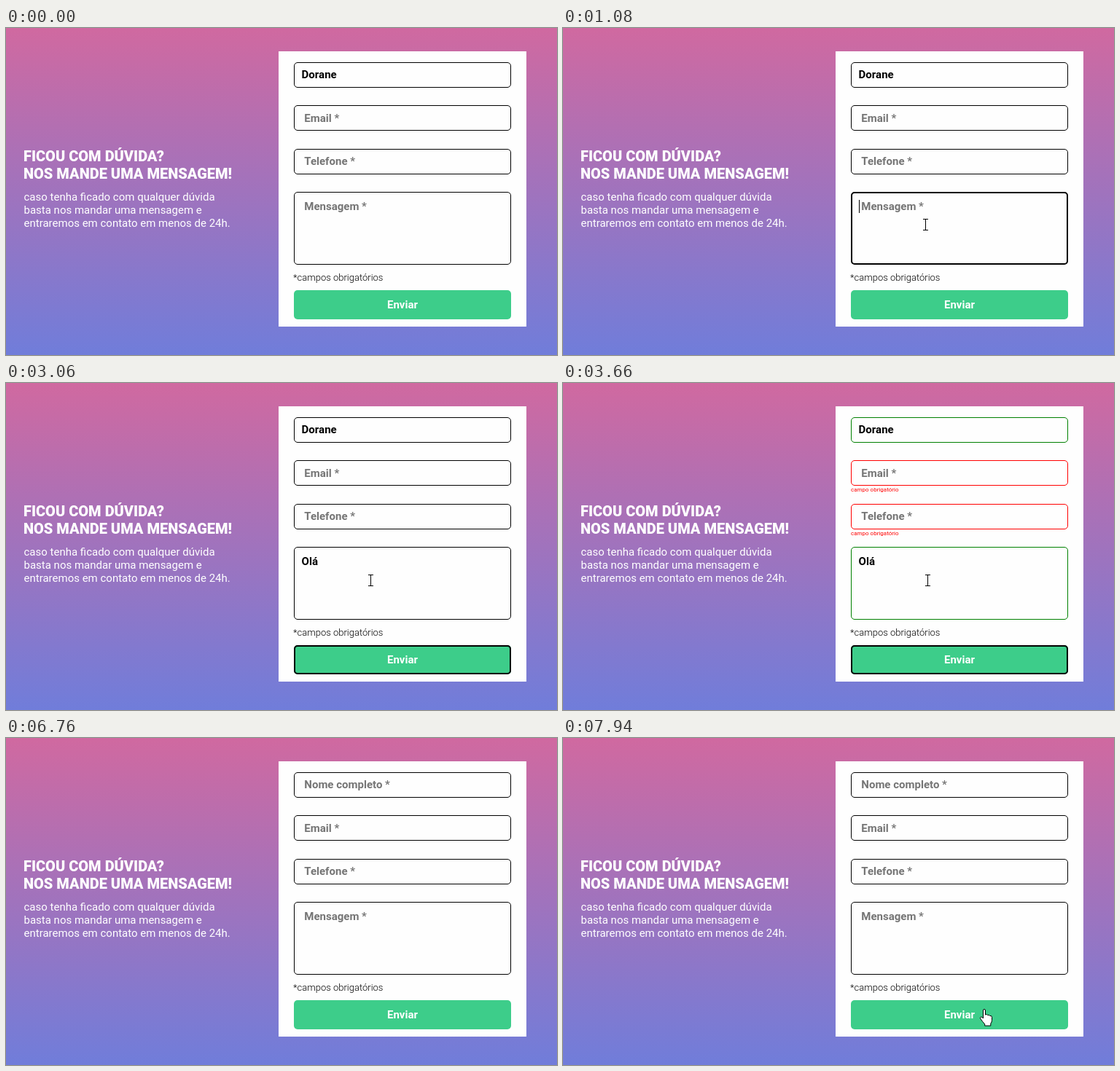
An HTML page that plays this animation: 756 px wide and 449 px high, repeating every 8000 ms.

```html
<!DOCTYPE html>
<html lang="pt-BR">
<head>
<meta charset="utf-8">
<title>Formulário de contato</title>
<style>
  html, body { margin: 0; width: 100%; height: 100%; overflow: hidden; }
  svg { display: block; width: 756px; height: 449px; font: 15px Roboto, sans-serif; }
  .title { font-size: 20px; font-weight: 900; }
  .field { fill: none; }
  .value, .send { font-weight: 700; }
  .note { font-size: 13px; font-weight: 300; }
  .error { font-size: 8px; fill: red; }
  .pointer { fill: #fff; stroke: #000; stroke-linejoin: round; }
</style>
</head>
<body>
<svg viewBox="0 0 756 449">
  <defs>
    <linearGradient id="sky" x2="0" y2="1">
      <stop stop-color="#d069a0"/>
      <stop offset="1" stop-color="#707dda"/>
    </linearGradient>
  </defs>
  <rect width="756" height="449" fill="url(#sky)"/>
  <g fill="#fff">
    <g class="title">
      <text x="24" y="183">FICOU COM DÚVIDA?</text>
      <text x="24" y="207">NOS MANDE UMA MENSAGEM!</text>
    </g>
    <text x="24.5" y="237">caso tenha ficado com qualquer dúvida</text>
    <text x="24.5" y="255">basta nos mandar uma mensagem e</text>
    <text x="24.5" y="273">entraremos em contato em menos de 24h.</text>
  </g>
  <rect x="374" y="32" width="340" height="378" fill="#fefefe"/>
  <g id="form"></g>
  <rect id="caret" y="236" width="1" height="18"/>
  <text class="note" x="394" y="347">*campos obrigatórios</text>
  <rect x="395" y="360" width="298" height="40" rx="5" fill="#3dcd8a"/>
  <rect id="ring" x="396" y="361" width="296" height="38" rx="4" fill="none" stroke="#000" stroke-width="2"/>
  <text class="send" x="544" y="385" fill="#fff" text-anchor="middle">Enviar</text>
  <g id="cursor">
    <path id="arrow" class="pointer" d="M.5.5v16l3.7-3.6 2.4 5.5 2.2-1-2.4-5.2h5z"/>
    <path id="beam" fill="none" stroke="#000" d="M-3-7.5h7M-3 7.5h7M.5-7.5v15"/>
    <path id="hand" class="pointer" d="M-1.5 13V2a1.5 1.5 0 0 1 3 0v6q2.8-1.2 3.3.6 2.3-.8 3 .9 2.7-.5 2.7 1.8v4q0 3-1.7 4.8v3H.7v-2.3Q-2.2 18-5.3 13.3-6 11.5-4.5 11-3 10.8-1.5 13z"/>
  </g>
</svg>
<script>
const LOOP = 8000;
const FOCUS = 1010, TAB = 3060, SUBMIT = 3660, RESET = 6760, BLINK = 530;
const KEYS = [[1870, 'O', 416], [2070, 'Ol', 420], [2330, 'Olá', 428]];

// Pointer stops: time, x, y. Each move is shown in discrete steps.
const MOVES = [
  { step: 80, end: 5120, stops: [[330, 637, 405], [490, 580, 335], [650, 496, 256],
    [730, 492, 262], [810, 497, 270], [1010, 497, 270], [1340, 500, 271]] },
  { step: 70, end: LOOP, stops: [[7030, 425, 2], [7240, 450, 110], [7520, 530, 285],
    [7800, 578, 366], [7940, 578, 372]] }
];

const $ = id => document.getElementById(id);
const show = (node, on) => node.style.display = on ? '' : 'none';

function add(tag, attributes) {
  const node = document.createElementNS('http://www.w3.org/2000/svg', tag);
  for (const name in attributes) node.setAttribute(name, attributes[name]);
  return $('form').appendChild(node);
}

function makeField(hint, y, height, baseline) {
  return {
    hint, y, height,
    box: add('rect', { class: 'field' }),
    text: add('text', { class: 'value', y: baseline }),
    error: add('text', { class: 'error', x: 395, y: y + height + 8 })
  };
}

const fields = [
  makeField('Nome completo *', 47, 35, 69),
  makeField('Email *', 106, 35, 129),
  makeField('Telefone *', 166, 35, 188),
  makeField('Mensagem *', 225, 100, 250)
];

function drawField(field, value, focused, checked) {
  const line = focused ? 2 : 1;
  const frame = {
    x: 395 + line / 2, y: field.y + line / 2, rx: 5 - line / 2,
    width: 298 - line, height: field.height - line,
    'stroke-width': line, stroke: !checked ? '#000' : value ? 'green' : 'red'
  };
  for (const name in frame) field.box.setAttribute(name, frame[name]);
  field.text.textContent = value || field.hint;
  field.text.setAttribute('x', value ? 405.6 : 409.3);
  field.text.setAttribute('fill', value ? '#000' : '#757575');
  field.error.textContent = checked && !value ? 'campo obrigatório' : '';
}

function pointerAt(t) {
  const move = MOVES.find(m => t >= m.stops[0][0] && t < m.end);
  if (!move) return null;
  const { step, stops } = move, start = stops[0][0];
  const time = start + Math.floor((t - start) / step) * step;
  const next = stops.findIndex(s => s[0] > time);
  if (next < 0) return stops[stops.length - 1].slice(1);
  const [t0, x0, y0] = stops[next - 1], [t1, x1, y1] = stops[next];
  const k = (time - t0) / (t1 - t0);
  return [x0 + (x1 - x0) * k, y0 + (y1 - y0) * k].map(Math.round);
}

function drawPointer(t) {
  const point = pointerAt(t);
  show($('cursor'), point);
  if (!point) return;
  const [x, y] = point;
  const inside = (top, height) => x >= 395 && x < 693 && y >= top && y < top + height;
  const shape = inside(360, 40) ? 'hand'
    : fields.some(f => inside(f.y, f.height)) ? 'beam' : 'arrow';
  for (const id of ['arrow', 'beam', 'hand']) show($(id), id === shape);
  $('cursor').setAttribute('transform', `translate(${x} ${y})`);
}

function draw(t) {
  const typed = KEYS.filter(k => t >= k[0]).pop() || [FOCUS, '', 406];
  const editing = t >= FOCUS && t < TAB;
  const checked = t >= SUBMIT && t < RESET;
  const values = t < RESET ? ['Dorane', '', '', typed[1]] : [];
  fields.forEach((field, i) => drawField(field, values[i], editing && i === 3, checked));
  show($('caret'), editing && Math.floor((t - typed[0]) / BLINK) % 2 === 0);
  $('caret').setAttribute('x', typed[2]);
  show($('ring'), t >= TAB && t < RESET);
  drawPointer(t);
}

const began = performance.now();
function tick() {
  draw((performance.now() - began) % LOOP);
  requestAnimationFrame(tick);
}
tick();
</script>
</body>
</html>
```
